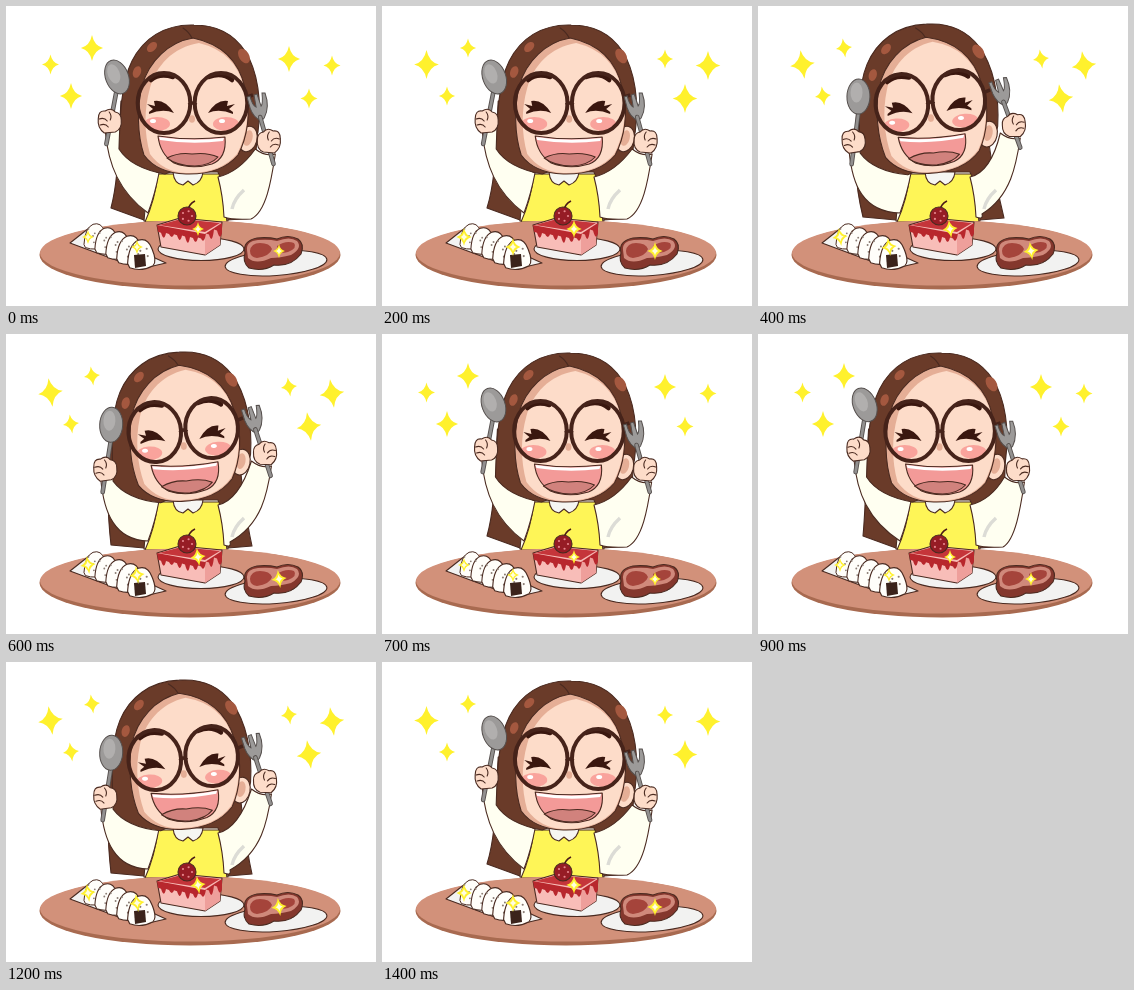
Recreate the animation shown at these times as an HTML page. Size 370 px wide and 300 px high, loop 1500 ms.

```html
<!DOCTYPE html>
<html lang="en">
<head>
<meta charset="utf-8">
<title>Dinner time</title>
<style>
  html, body { margin: 0; width: 100%; height: 100%; overflow: hidden; background: #fff; }
  svg { display: block; width: 370px; height: 300px; }
  .line { stroke: #4a2a20; stroke-width: 1.1; stroke-linejoin: round; stroke-linecap: round; }
  .none { fill: none; }
  .hair { fill: #6a3b29; }
  .skin { fill: #fddcc9; }
  .shade { fill: #e5ae96; }
  .cloth { fill: #fffff1; }
  .plate { fill: #f2f2f1; }
  .metal { fill: #9c9a99; stroke: #554f4d; }
  .rod { fill: none; stroke: #554f4d; stroke-width: 4.6; stroke-linecap: round; }
  .rod + .rod { stroke: #92908f; stroke-width: 2.8; }
</style>
</head>
<body>
<svg viewBox="0 0 370 300">
  <defs>
    <ellipse id="lens" class="none" cx="159" cy="97" rx="26.300" ry="30" stroke="#46231a" stroke-width="4"/>
    <g id="cheek">
      <ellipse fill="#f9a39c" cx="152" cy="118" rx="13" ry="7"/>
      <ellipse fill="#fff" cx="148" cy="115" rx="3" ry="2"/>
    </g>
    <path id="eye" fill="#3a170f" d="M144 106L148 103L142 98L150 100L149 95Q160 93 169 107Q158 102 144 108Z"/>
    <g id="fist">
      <path class="skin line" d="M-11-1Q-11-10-4-9Q2-13 6-8Q12-7 12 0Q13 9 6 12L-5 13Q-12 8-11-1Z"/>
      <path class="none line" d="M-10-1q5-2 8 2m-7 4q5-2 8 2M0-8q3 4 1 8"/>
    </g>
  </defs>

  <path id="back" class="hair line"/>
  <path class="cloth line" d="M150 166Q139 190 138 215H222Q220 188 212 166Z"/>
  <path class="line" fill="#fef557" d="M152 168Q149 194 139 216H221Q218 190 213 168Z"/>
  <path class="line" fill="#f6f6f2" d="M167 166Q168 178 177 179L182 175L187 179Q196 176 197 166Z"/>
  <path id="sleeveL" class="cloth line"/>
  <path id="sleeveR" class="cloth line"/>
  <path class="none" stroke="#dcdcd6" stroke-width="3.500" d="M226 203Q228 193 238 184"/>

  <g id="head">
    <path class="hair line" d="M189 19C159 18 138 33 127 55C116 77 115 110 114 143Q126 162 160 168L236 140Q250 138 253 126C257 96 253 65 240 45C228 27 211 19 189 19Z"/>
    <g fill="#a4583f">
      <ellipse cx="239" cy="50" rx="5" ry="8" transform="rotate(-32 239 50)"/>
      <ellipse cx="132" cy="66" rx="4" ry="6" transform="rotate(20 132 66)"/>
      <ellipse cx="147" cy="41" rx="4" ry="6" transform="rotate(45 147 41)"/>
    </g>
    <ellipse class="skin line" cx="243" cy="133" rx="9" ry="13" transform="rotate(15 243 133)"/>
    <ellipse class="shade" cx="243" cy="132" rx="4.500" ry="8" transform="rotate(15 243 132)"/>
    <path class="shade line" d="M188 32C164 36 144 55 137 80C132 101 132 128 139 149Q152 167 181 168Q216 169 233 149C242 132 247 106 240 82Q231 41 188 32Z"/>
    <path class="skin" d="M194 37C168 41 151 60 145 82C139 103 139 127 145 148Q158 166 181 167Q215 168 232 148C241 132 246 106 239 82Q231 46 194 37Z"/>
    <path class="none line" d="M187 32Q184 26 178 22"/>
    <use href="#cheek"/>
    <use href="#cheek" x="69"/>
    <use href="#eye"/>
    <use href="#eye" transform="matrix(-1 0 0 1 372 0)"/>
    <path class="none" stroke="#3a170f" stroke-width="4.500" stroke-linecap="round" d="M146 74Q154 67 168 71M204 71Q217 66 227 74"/>
    <ellipse class="shade" cx="187" cy="113" rx="3" ry="3.800"/>
    <path class="line" fill="#f39a98" d="M153 130Q185 135 220 131Q222 152 207 158Q187 164 169 157Q155 148 153 130Z"/>
    <path fill="#fff" d="M154 131Q185 136 219 132L218 135Q186 139 155 134Z"/>
    <path class="line" fill="#d1827d" d="M162 152Q174 146 187 148Q202 146 213 151Q206 159 190 160Q172 160 162 152Z"/>
    <use href="#lens"/>
    <use href="#lens" x="57"/>
    <path class="none" stroke="#46231a" stroke-width="3.600" d="M184 99Q187.500 95 191 99M242 91l6-2"/>
  </g>

  <g id="spoon">
    <path class="rod" d="M8-32L-3 24"/>
    <path class="rod" d="M8-32L-3 24"/>
    <g id="bowl">
      <ellipse class="metal" rx="11.500" ry="17.500"/>
      <ellipse fill="#b1afae" cx="-2" cy="-4" rx="6" ry="10"/>
    </g>
    <use href="#fist"/>
  </g>
  <g id="fork">
    <path class="metal" d="M-22-43L-19-44Q-17-35-13-33L-15-45L-12-46L-8-34Q-6-36-7-47L-4-47Q1-33-5-22L-8-19Q-16-23-19-32Z"/>
    <path class="rod" d="M-9-23L4 24"/>
    <path class="rod" d="M-9-23L4 24"/>
    <use href="#fist" transform="scale(-1 1)"/>
  </g>

  <ellipse cx="184" cy="249" rx="150.500" ry="34.500" fill="#a86a50"/>
  <ellipse cx="184" cy="247" rx="150" ry="32.500" fill="#d2917a"/>

  <path class="plate line" d="M64 237L83 222L160 257L134 263Z"/>
  <g id="rice"></g>
  <path fill="#3b231b" d="M128 249L139 248L140 260L129 262Z"/>

  <ellipse class="plate line" cx="195" cy="243" rx="43" ry="11.500"/>
  <path class="line" fill="#f8bdb8" d="M151 219L174 212L216 216L214 239L199 249L155 241Z"/>
  <path fill="#ee9f9b" d="M199 228L215 217L214 239L199 249Z"/>
  <path id="icing" fill="#b8272d"/>
  <path fill="#c5353a" d="M153 219L175 213L214 217L199 226Z"/>
  <path class="none" stroke="#4a1a18" stroke-width="1.600" d="M182 204Q183 198 189 195"/>
  <circle class="line" fill="#961c25" cx="181" cy="210" r="9"/>
  <g id="seeds" fill="#e6868c"></g>

  <ellipse class="plate line" cx="270" cy="257" rx="51" ry="12.500" transform="rotate(-4 270 257)"/>
  <path class="line" fill="#84372d" d="M239 247Q236 235 251 232Q262 231 271 233Q282 228 292 233Q299 238 295 248Q285 261 268 259Q257 266 243 262Q236 256 239 247Z"/>
  <path fill="#d0897b" d="M241 244Q240 235 252 234Q263 233 271 235Q284 230 291 235Q297 242 285 249Q274 252 265 252Q250 259 242 252Z"/>
  <path fill="#a5443b" d="M244 245Q245 237 254 237Q264 237 266 243Q264 250 251 252Q244 251 244 245ZM271 240Q280 234 288 237Q292 242 282 246Q272 249 271 240Z"/>

  <g id="stars"></g>
</svg>
<script>
const $ = id => document.getElementById(id);
const NS = 'http://www.w3.org/2000/svg';
const add = (parent, tag, attrs) => {
  const el = document.createElementNS(NS, tag);
  for (const k in attrs) el.setAttribute(k, attrs[k]);
  return parent.appendChild(el);
};
const place = (id, x, y, turn, pivot = '') =>
  $(id).setAttribute('transform', `translate(${x} ${y}) rotate(${turn} ${pivot})`);

// Row of rice balls, each overlapping the last
for (let i = 0; i < 5; i++) {
  const ball = add($('rice'), 'g', {
    transform: `translate(${87 + 11.3 * i} ${230 + 4.5 * i}) scale(${0.9 + 0.04 * i})`
  });
  add(ball, 'path', { class: 'line', fill: '#fffefa', d: 'M-10 9Q-9-9 0-13Q9-16 13-5Q18 7 14 11Q3 17-8 13Z' });
  for (let k = 0; k < 6; k++) {
    add(ball, 'circle', { cx: -5 + k * 7 % 15, cy: -8 + k * 5 % 17, r: 1, fill: '#8a7c74' });
  }
}

// Icing drips along the front and side of the cake
let icing = 'M151 219L199 228L216 217V227';
for (let x = 216; x > 152; x -= 8) {
  const edge = x > 199 ? 233 - (x - 199) * 0.5 : 233 - (199 - x) * 0.16;
  icing += `Q${x - 2} ${edge + 9 + 3 * Math.sin(x)} ${x - 5} ${edge}L${x - 8} ${edge - 1}`;
}
$('icing').setAttribute('d', icing + 'Z');

for (let i = 0; i < 5; i++) {
  add($('seeds'), 'circle', { cx: 181 + 5 * Math.cos(i * 1.26), cy: 210 + 5 * Math.sin(i * 1.26), r: 1.1 });
}

// Two sets of stars take turns being large
const STAR = 'M0-1Q.17-.17.85 0Q.17.17 0 1Q-.17.17-.85 0Q-.17-.17 0-1Z';
const stars = [];
function addStars(points, odd, small, large) {
  for (const [x, y] of points) {
    const el = add($('stars'), 'g', {});
    add(el, 'path', { d: STAR, fill: '#fff12d' });
    if (y > 200) add(el, 'path', { d: STAR, fill: '#fffde0', transform: 'scale(.5)' });
    stars.push({ el, x, y, odd, small, large });
  }
}
addStars([[86, 42], [65, 90], [283, 53]], 1, 9.5, 13);
addStars([[44.5, 58.5], [326, 59.5], [303, 92.5]], 0, 10, 14.5);
addStars([[82, 231], [131, 241], [192, 223], [273, 245]], 0, 7, 9);

function pose(beat) {
  const angle = beat * Math.PI / 3;
  const dx = 7 * Math.cos(angle - 1.68) - 6.2;
  const lean = Math.cos(angle - 2.09) < 0 ? 1 : 0;
  const lx = 104 + dx * 0.75, ly = 114 + 20 * lean;
  const rx = 264 + dx * 0.65, ry = 134 - 16 * lean;

  place('head', dx, -lean, -4 * lean, '187 145');
  place('spoon', lx, ly, dx * 0.3);
  place('bowl', 8, -43, -20 + 25 * lean);
  place('fork', rx, ry, dx * 0.4);

  const left = 116 + dx - 5 * lean, right = 252 + dx - 14 * lean;
  $('back').setAttribute('d',
    `M${left} 95C${left - 3} 150 ${left - 3} 175 105 ${202 + 9 * lean}L138 214H222L246 212` +
    `C240 185 ${right + 4} 150 ${right} 95Z`);
  $('sleeveL').setAttribute('d',
    `M${lx - 4} ${ly + 11}C${lx - 1} ${ly + 45} ${lx + 10} ${ly + 72} 142 207` +
    `Q149 188 153 167Q130 158 ${lx + 13} ${ly + 6}Q${lx + 5} ${ly + 14} ${lx - 4} ${ly + 11}Z`);
  $('sleeveR').setAttribute('d',
    `M${rx + 6} ${ry + 14}C${rx + 2} ${ry + 40} ${rx - 3} ${ry + 72} ${245 - 21 * lean} ${213 - 5 * lean}` +
    `Q226 214 218 211Q217 190 212 171Q233 166 ${rx - 14} ${ry + 9}Q${rx - 4} ${ry + 17} ${rx + 6} ${ry + 14}Z`);

  const odd = Math.round(beat) % 2;
  for (const s of stars) {
    const size = s.odd === odd ? s.large : s.small;
    s.el.setAttribute('transform', `translate(${s.x} ${s.y}) rotate(${-8 * lean}) scale(${size})`);
  }
}

// Six beats per sway; the loop starts just before the first beat
let last = -1;
function draw(now) {
  const step = Math.floor(now % 1500 / 100);
  if (step !== last) pose(Math.max(step, 0.9));
  last = step;
  requestAnimationFrame(draw);
}
draw(performance.now());
</script>
</body>
</html>
```
